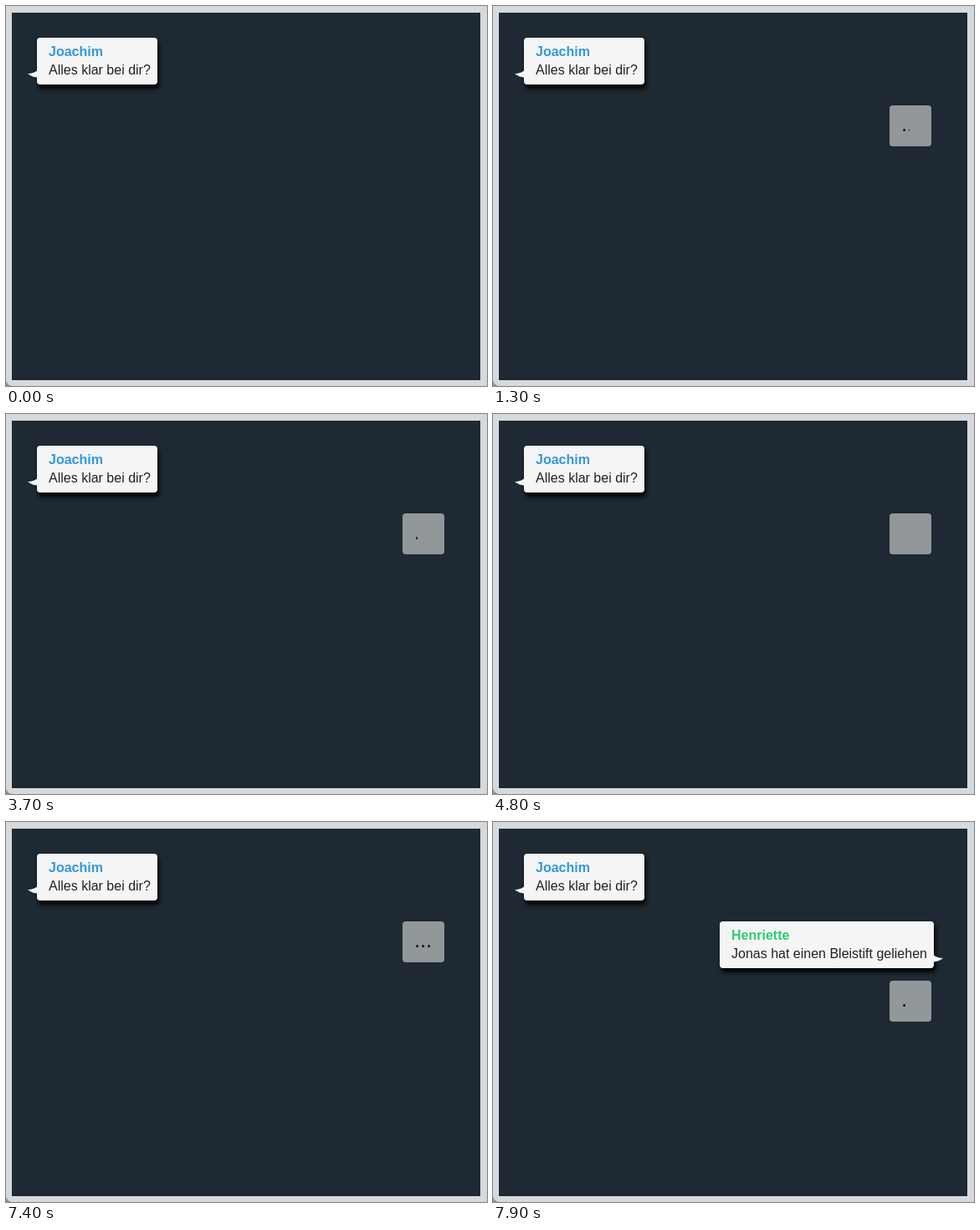
An HTML page with a canvas that plays this animation: 575 by 455 pixels, repeating every 8000 ms.

```html
<!DOCTYPE html>
<html lang="de">
<head>
<meta charset="utf-8">
<title>Chat</title>
<style>
  html, body { margin: 0; width: 100%; height: 100%; overflow: hidden; background: #d6dadc; }
  canvas { display: block; width: 575px; height: 455px; }
</style>
</head>
<body>
<canvas id="stage" width="575" height="455"></canvas>
<script>
const ctx = document.getElementById('stage').getContext('2d');
const FONT = '"Liberation Sans", Arial, sans-serif';
const LOOP = 8000, TICK = 100;
const TYPING_AT = 400, REPLY_AT = 7500;

// Typing indicator: dots wipe in one by one, then all clear.
const CYCLE = 1367, CYCLE_START = 633;
const DOT_DELAY = 192, DOT_GAP = 453.5, COLUMN_MS = 85;

const messages = [
  { x: 37, y: 38, w: 144, side: -1, tail: 39, color: '#3498db', name: 'Joachim', text: 'Alles klar bei dir?' },
  { x: 271, y: 119, w: 256, side: 1, tail: 40, color: '#2ecc71', name: 'Henriette', text: 'Jonas hat einen Bleistift geliehen' }
];

function box(x, y, w, h, radius, color) {
  ctx.fillStyle = color;
  ctx.beginPath();
  ctx.roundRect(x, y, w, h, radius);
  ctx.fill();
}

function label(text, x, y, color, weight) {
  ctx.font = `${weight} 16px ${FONT}`;
  ctx.fillStyle = color;
  ctx.fillText(text, x, y);
}

function drawTail(x, y, side) {
  ctx.save();
  ctx.translate(x, y);
  ctx.scale(side, 1);
  ctx.fillStyle = '#f5f5f5';
  ctx.beginPath();
  ctx.moveTo(-1, 0);
  ctx.lineTo(0, 0.5);
  ctx.quadraticCurveTo(4, 3.6, 11, 4);
  ctx.quadraticCurveTo(6, 8.2, 0, 8.4);
  ctx.lineTo(-1, 8.4);
  ctx.fill();
  ctx.restore();
}

function drawMessage(m) {
  ctx.save();
  ctx.shadowColor = '#000';
  ctx.shadowBlur = 5;
  ctx.shadowOffsetX = 2;
  ctx.shadowOffsetY = 5;
  box(m.x, m.y, m.w, 56, 4, '#f5f5f5');
  ctx.restore();
  drawTail(m.side < 0 ? m.x : m.x + m.w, m.y + m.tail, m.side);
  label(m.name, m.x + 14, m.y + 22, m.color, 'bold');
  label(m.text, m.x + 14, m.y + 44, '#222', 'normal');
}

function drawTyping(t, y) {
  box(474, y, 50, 49, 4, '#92979a');
  const phase = (t - CYCLE_START + CYCLE) % CYCLE;
  ctx.fillStyle = '#080a0c';
  for (let i = 0; i < 3; i++) {
    const age = phase - DOT_DELAY - i * DOT_GAP;
    if (age < 0) break;
    const columns = Math.floor(age / COLUMN_MS) + 1;
    ctx.fillRect(490.4 + i * 7, y + 28.3, Math.min(columns, 2.8) - 0.4, 2.7);
  }
}

function drawFrame() {
  box(0, 0, 575, 455, 0, '#8c9093');
  box(0, 0, 575, 455, [0, 0, 0, 8], '#d6dadc');
  box(7, 8, 560, 440, 0, '#1e2933');
}

function draw(t) {
  const replied = t >= REPLY_AT;
  drawFrame();
  drawMessage(messages[0]);
  if (replied) drawMessage(messages[1]);
  // The first cycle begins before the loop, so shift by one more period.
  if (t >= TYPING_AT) drawTyping(t, replied ? 190 : 119);
}

const start = performance.now();
function loop() {
  const t = (performance.now() - start) % LOOP;
  draw(Math.floor(t / TICK) * TICK);
  requestAnimationFrame(loop);
}
loop();
</script>
</body>
</html>
```
